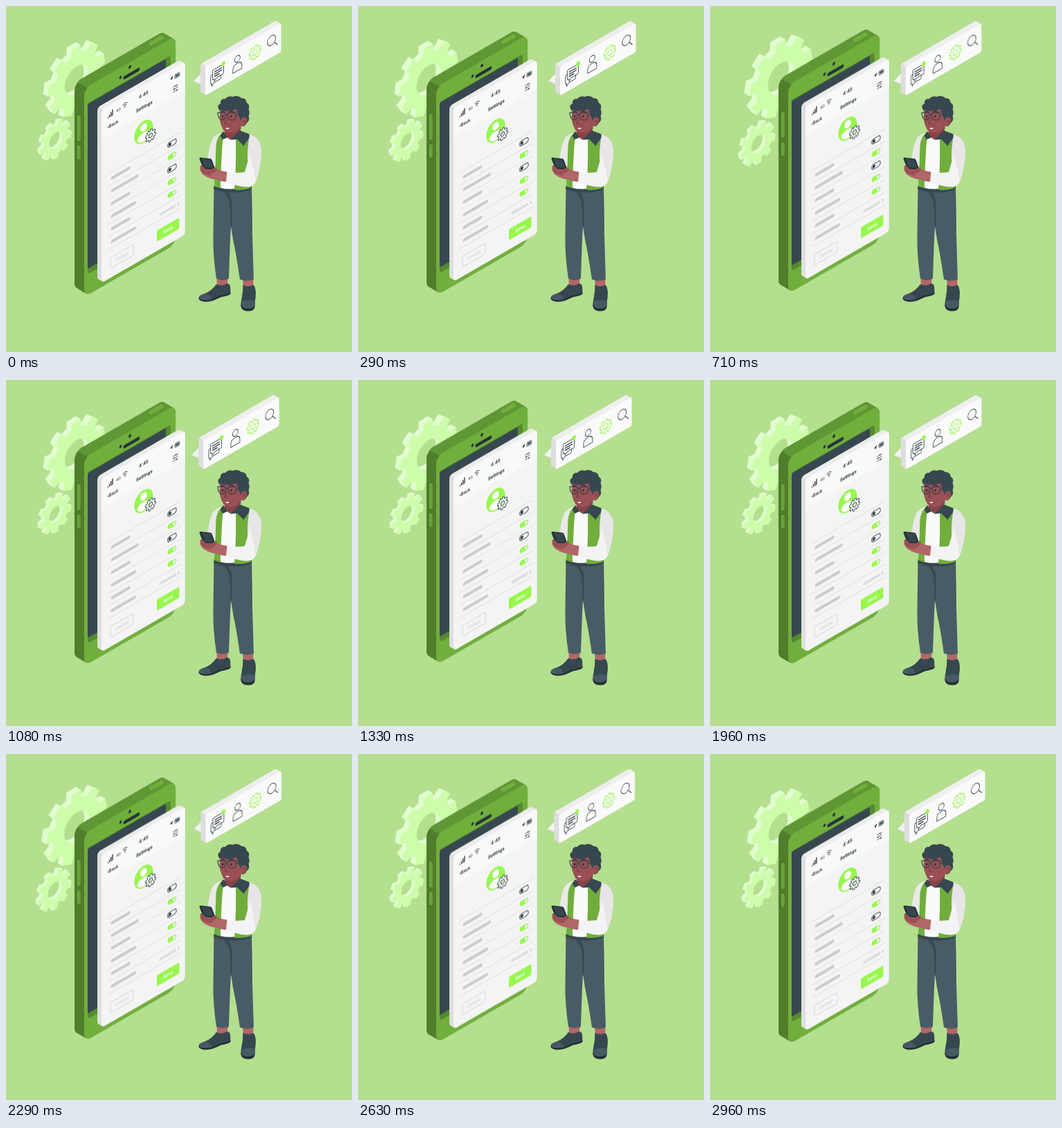
Write an HTML page that moves like this. It is 500 px wide and 500 px high and loops after 3000 ms.

```html
<!DOCTYPE html>
<html lang="en">
<head>
<meta charset="utf-8">
<title>Account settings</title>
<style>
  html, body { margin: 0; width: 100%; height: 100%; overflow: hidden; background: #b3df8e; }
  svg { display: block; width: 100vw; height: 100vh; }
  text { font-family: Inter, Lato, sans-serif; font-weight: 600; fill: #263238; text-anchor: middle; }

  .gears { transform-origin: 96px 138px; animation: beat 1.5s ease infinite; }
  .device { animation: hover 3s linear infinite; }
  .bubble { animation: shake 1.5s ease infinite; }

  @keyframes beat {
    0%, 30%, 40%, 60%, 100% { transform: scale(1); }
    10%, 50% { transform: scale(1.1); }
  }
  @keyframes hover {
    50% { transform: translateY(-10px); }
  }
  @keyframes shake {
    0%, 100% { transform: translateX(0); }
    10%, 90% { transform: translateX(-2px); }
    20%, 80% { transform: translateX(4px); }
    30%, 50%, 70% { transform: translateX(-6px); }
    40%, 60% { transform: translateX(8px); }
  }

  .ink { fill: none; stroke: #37474f; stroke-width: 1; stroke-linecap: round; stroke-linejoin: round; }
  .fine { stroke-width: .75; }
  .bold { stroke-width: 1.6; }
  .gear { fill: #cdfcaa; }
  .lime { fill: #98f74f; }
  .rule { stroke: #dedede; stroke-width: .9; }
  .bar { stroke: #cbcbcb; stroke-width: 4.6; stroke-linecap: round; }
  .dark { fill: #263238; }
  .slate { fill: #37474f; }
  .skin { fill: #9a5054; }
  .hand { fill: #b16668; }
  .vest { fill: #6fae3b; }
</style>
</head>
<body>
<svg viewBox="0 0 500 500">
  <g class="gears">
    <g transform="matrix(.866 -.5 0 1 102 107)">
      <path class="gear" data-gear="9 48 38 20 -51" data-depth="8" data-side="#e2fdd0"/>
    </g>
    <g transform="matrix(.866 -.5 0 1 72 194)">
      <path class="gear" data-gear="9 26.5 20.5 11 -71" data-depth="4.5" data-side="#e2fdd0"/>
    </g>
  </g>

  <g class="device">
    <g transform="matrix(.866 -.5 0 1 147 243)">
      <rect x="-39.3" y="-143.5" width="152.5" height="301" rx="11" data-depth="16.1" data-side="#507f2d" data-top="#5f9735" fill="#71af3d"/>
      <rect x="-33.5" y="-119" width="138.5" height="247" rx="4" fill="#558a2f"/>
      <rect class="slate" x="-33.5" y="-118" width="130.5" height="238" rx="2"/>
      <path d="M28.5-125.500H51" stroke="#263238" stroke-width="5" stroke-linecap="round"/>
      <circle class="dark" cx="21.400" cy="-129" r="2.100"/>
      <circle class="dark" cx="37" cy="-136.500" r="2.300"/>
    </g>
    <g stroke-linecap="round">
      <path d="M209.500 54 225 45.500" stroke="#71af3d" stroke-width="5.500"/>
      <path d="M104.500 160V193M104.500 204V219" stroke="#406824" stroke-width="7"/>
      <path d="M105 160V193M105 204V219" stroke="#67a238" stroke-width="5.500"/>
    </g>

    <g transform="matrix(.866 -.5 0 1 147 243)">
      <rect x="-10.400" y="-98" width="139.400" height="250" rx="5" data-depth="6.900" data-side="#dfdfdf" data-top="#ececec" fill="#f4f4f4"/>
      <path d="M-10.400-56V-93q0-5 5-5H124q5 0 5 5V-56z" fill="#f9f9f9"/>

      <path d="M.5-82v1.500M3-84.500v4M5.500-87v6.500M8-89.500v9" stroke="#263238" stroke-width="1.500"/>
      <text x="18" y="-82" font-size="5.600" style="font-weight:400">4G</text>
      <path class="ink" d="M25.500-87q3.500-3 7 0M27-84.800q2-1.600 4 0"/>
      <circle class="dark" cx="29" cy="-82.700" r=".9"/>
      <text x="60" y="-82.500" font-size="7">4:45</text>
      <path class="dark" d="M103.500-85 109-88 107-82.500 106-84.600z"/>
      <rect class="ink fine" x="112" y="-87.500" width="8" height="5.600" rx="1.500"/>
      <rect x="113" y="-86.500" width="6" height="3.600" fill="#455a64"/>
      <text x="8.500" y="-65.500" font-size="6.600">‹Back</text>
      <text x="61" y="-65" font-size="6.800" style="font-weight:700">Settings</text>
      <path class="ink fine" d="M109-71h8M109-67.500h8M109-64h8"/>
      <path d="M114-72v2M111-68.500v2M115-65v2" stroke="#263238" stroke-width="1.500"/>

      <circle class="lime" cx="60" cy="-31" r="15.800"/>
      <circle cx="60" cy="-37.500" r="5.600" fill="#fafafa"/>
      <path d="M49-23q1-7 11-7t11 7q-4 6-11 6t-11-6z" fill="#fafafa"/>
      <g transform="translate(71.600 -20.200)">
        <path class="ink" data-gear="8 8.800 6.500 3 10" style="fill:#f4f4f4"/>
      </g>

      <path class="rule" d="M0 0H122M0 18.300H122M0 36.600H122M0 54.900H122M0 73.200H122M0 91.500H122M0 109.800H122"/>
      <path class="bar" d="M7.500 9.200H35.500M7.500 27.500H49.500M7.500 45.800H35.500M7.500 64.100H45M7.500 82.400H35.500M7.500 100.700H45"/>
      <path class="bar" d="M88 102H112.500" style="stroke:#dcdcdc;stroke-width:4"/>
      <path d="M117 99.500 119 102 117 104.500" fill="none" stroke="#bdbdbd"/>
      <g id="toggles"></g>

      <rect x="4.600" y="123" width="38" height="15.500" rx="2" fill="none" stroke="#d4d4d4"/>
      <text x="23.700" y="133" font-size="6.600" style="fill:#d4d4d4">Cancel</text>
      <rect class="lime" x="82" y="122.500" width="37.500" height="16" rx="2"/>
      <text x="100.700" y="133" font-size="6.800" style="fill:#fff;font-weight:700">Save</text>
    </g>
  </g>

  <g class="bubble">
    <path d="M283 95 280 100 271 108.500 288 117z" fill="#dedede"/>
    <path d="M281 98 271 108.500 283 112z" fill="#f2f2f2"/>
    <g transform="matrix(.866 -.5 0 1 288 88)">
      <rect width="126.500" height="41.500" rx="2.500" data-depth="8" data-side="#dedede" data-top="#eeeeee" fill="#fafafa"/>
      <path class="ink" d="M14 11H28.500q2 0 2 2V23q0 2-2 2H19l-4 3.500V25H14q-2 0-2-2V13q0-2 2-2z"/>
      <path class="ink" d="M12 17H11q-2 0-2 2V28q0 2 2 2v3.500l4-3.500H24q2 0 2-2V25"/>
      <path class="ink bold" d="M15.500 15H27M15.500 18.200H27M15.500 21.400H23"/>
      <circle class="lime" cx="30" cy="10.500" r="3.400"/>
      <circle class="ink" cx="53.500" cy="15" r="4.600"/>
      <path class="ink" d="M46 32.500V28q0-6.500 7.500-6.500t7.500 6.500v4.500z"/>
      <g transform="translate(83 20.600)" fill="none" stroke="#98f74f" stroke-width="1.100">
        <path data-gear="8 10 7.500 3.800 10"/>
      </g>
      <circle class="ink" cx="110.500" cy="17" r="6.900"/>
      <path class="ink" d="M115.400 22 120.500 28"/>
    </g>
  </g>

  <g class="man">
    <!-- shoes and ankles -->
    <path class="hand" d="M304.500 391H321L319.500 406H305zM342 394H357.500L357 408H343z"/>
    <path class="slate" d="M304 402q7 4 15-1 4 0 5 4l.5 10q-2 3-7 3.500-7 .5-13 4-7 4.500-17 4.500-9-.5-9-5 1-4 9-6.500 10-4 16.500-13.500z"/>
    <path d="M279 420q2-3 9-4.500 7 1 10 8-6 3-11 3-8-1-8-6.500z" fill="#455a64"/>
    <path class="dark" d="M278.500 421.500q3 4 9.500 3.500 8 0 15-4 6-3.500 13-4 5-.5 8.500-3v2q-3 3-8 3.500-6 .5-12 4-8 4-17 4-9-1-9-6z"/>
    <path class="slate" d="M342.500 403q7 4 15 0 3 3 3.500 11 0 6-1 12l-.5 8q-1 6.500-10 6.500t-10-7q-.5-5 1-11 2-9 2-19.500z"/>
    <path d="M340.500 427q9-4 19.500 0l-.8 6q-1.500 5-9.700 5-9 0-10-6z" fill="#455a64"/>
    <path class="dark" d="M339.500 431q2 6 10 6t10-5v3q-1 6-10 6t-10-7z"/>

    <!-- trousers -->
    <path d="M300.500 260H355Q356 295 356 330L358 395Q348 399 338 395 333 360 328.500 340L325 318Q324 335 323.500 350L322 394Q313 398 304 394 299 360 299.500 334z" fill="#485c66"/>
    <path class="slate" d="M311 264q13 4 15 17l.5 32-1.500 9q-1-14-1-24 0-16-4-22-2-5-9-12z"/>
    <path class="slate" d="M300.500 260q25 7 54.500 1v4q-12 5-27 4.500-14 0-27.500-4.500z"/>

    <!-- left sleeve -->
    <path d="M312 182.500Q300 187 297 195 292 210 291 226L296 238 306 240V190z" fill="#e9e9e9"/>

    <!-- shirt and vest -->
    <path d="M312 186 332 185 337 205 331 264q-11 1.500-21-1z" fill="#fafafa"/>
    <path class="vest" d="M309 187 314 185 312 210 309.500 263.500 301 260.500 302.500 232 303.500 203Q304 193 309 187z"/>
    <path class="vest" d="M332 192 346 184Q354 187 355 197L354 263Q343 267 330 265.500 333 230 332 192z"/>

    <!-- neck and collar -->
    <path d="M317 175 340 172 338 186 324 193 315 187z" fill="#8a4347"/>
    <path class="slate" d="M314 181 320 190 313 193 309.500 187zM338 180 350 184.500Q354 187 352 190L343.500 202 334 192.500 324 193.500z"/>

    <!-- right sleeve -->
    <path d="M352 185.500Q362 188 367 198 370 207 369 217 367 239 361 254 348 236 349 215 349 205 352 185.500z" fill="#e6e6e6"/>
    <path d="M319 240Q331 242 345 240L353 212 361 254Q357 262 347 261.500 333 260.500 317.500 254z" fill="#f3f3f3"/>

    <!-- hand and handset -->
    <path class="hand" d="M319.500 239.500 318 254q-8-.5-13-3-6 0-13-3-9-4-11-10-1-5 1.500-8l8 4 14 1.500q6 3 15 4z"/>
    <path class="dark" d="M281 219 295 220.500q2 .5 2.500 2l4.500 12q0 2-2 2L287 235.500q-2-.5-2.500-2L279.500 221q0-2 1.500-2z"/>
    <path class="slate" d="M282.500 220.500 295 221.700 299.500 234 287.500 233.500z"/>
    <path class="skin" d="M280.500 231q4-1 7 4l8 2.500q6-5 8.500-4 2 2-2 6l-7 5q-9 0-14-7z"/>

    <!-- head -->
    <path class="slate" d="M308 150Q304 144 310 141 309 134 317 134 321 129 328 131 335 128 340 133 347 133 348 140 353 143 350.500 149 353 154 350.500 159 353 165 348 169 346 174 341 174L334 154 312 152Q309 153 308 150z"/>
    <path class="skin" d="M310 150Q322 154 333 149L336 160Q337 165 339 166 340 160 345 160.500 350 163 347.500 169 344 175 340 173 337 180 327 183 318 184 314 179 309 170 308.500 160z"/>
    <path d="M342 165q4-1 3 4M318.500 162l-2.500 7q1 1.500 4 1M316 176q4 1.500 8-1" fill="none" stroke="#743437"/>
    <path d="M317 175.500q3 1.500 6 0-1 2.500-3 2.500t-3-2.500z" fill="#fff"/>
    <path d="M310 153.500q3-2 6 0M322.500 153q4-2 7 .8" fill="none" stroke="#263238" stroke-width="1.400"/>
    <ellipse class="dark" cx="313" cy="159.500" rx="1.300" ry="1.800"/>
    <ellipse class="dark" cx="325.500" cy="159.500" rx="1.300" ry="1.800"/>
    <path d="M306 154.500q6-1.500 11 .5 1 9-5 9.500-5.500 0-6-10zM320.500 155q6-1.500 12 0 1 10-6 10-6 0-6-10zM317 157.500q2-1 3.500 0M332.500 157.500 343 159" fill="none" stroke="#37474f" stroke-width="1.300"/>
  </g>
</svg>

<script>
  const NS = 'http://www.w3.org/2000/svg';
  const make = (tag, attrs) => {
    const el = document.createElementNS(NS, tag);
    for (const key in attrs) el.setAttribute(key, attrs[key]);
    return el;
  };

  // Closed outline with n tapered teeth and a round hole.
  function gearPath(n, outer, inner, hole, start) {
    const step = 2 * Math.PI / n, points = [];
    for (let i = 0; i < n; i++) {
      const mid = start * Math.PI / 180 + i * step;
      for (const [offset, r] of [[-.31, inner], [-.23, outer], [.23, outer], [.31, inner]]) {
        const angle = mid + offset * step;
        points.push((r * Math.cos(angle)).toFixed(2) + ' ' + (r * Math.sin(angle)).toFixed(2));
      }
    }
    const arc = `a${hole} ${hole} 0 1 0 `;
    return `M${points.join('L')}ZM${-hole} 0${arc}${2 * hole} 0${arc}${-2 * hole} 0Z`;
  }

  // Thickness: copies shifted towards the back, then an optional top face.
  function extrude(el) {
    const { depth, side, top } = el.dataset;
    const add = node => el.parentNode.insertBefore(node, el);
    for (let d = +depth; d > 0; d -= .7) {
      const copy = el.cloneNode();
      copy.style.fill = side;
      copy.setAttribute('transform', `translate(${-d} ${-d})`);
      add(copy);
    }
    if (!top) return;
    const { x, y, width, height } = el.getBBox();
    const r = +el.getAttribute('rx') * .5;
    add(make('path', {
      d: `M${x + r} ${y + r}V${y + r * .4}l${-depth} ${-depth}L${x + 2 * r - depth} ${y - depth}` +
         `H${x + width - 2 * r - depth}l${1.4 * r} ${.6 * r}l${depth} ${depth}V${y + r}Z`,
      fill: top
    }));
  }

  document.querySelectorAll('[data-gear]').forEach(el => {
    el.setAttribute('d', gearPath(...el.dataset.gear.split(' ').map(Number)));
    el.setAttribute('fill-rule', 'evenodd');
  });
  document.querySelectorAll('[data-depth]').forEach(extrude);

  const toggles = document.getElementById('toggles');
  [false, true, false, true, true].forEach((on, i) => {
    const y = 8.8 + i * 18.3;
    toggles.append(
      make('rect', { x: 100, y: y - 3.6, width: 14.6, height: 7.2, rx: 3.6, class: on ? 'lime' : 'ink' }),
      make('circle', { cx: on ? 110.8 : 103.8, cy: y, r: 2.3, fill: on ? '#f4f4f4' : '#263238' })
    );
  });
</script>
</body>
</html>
```
